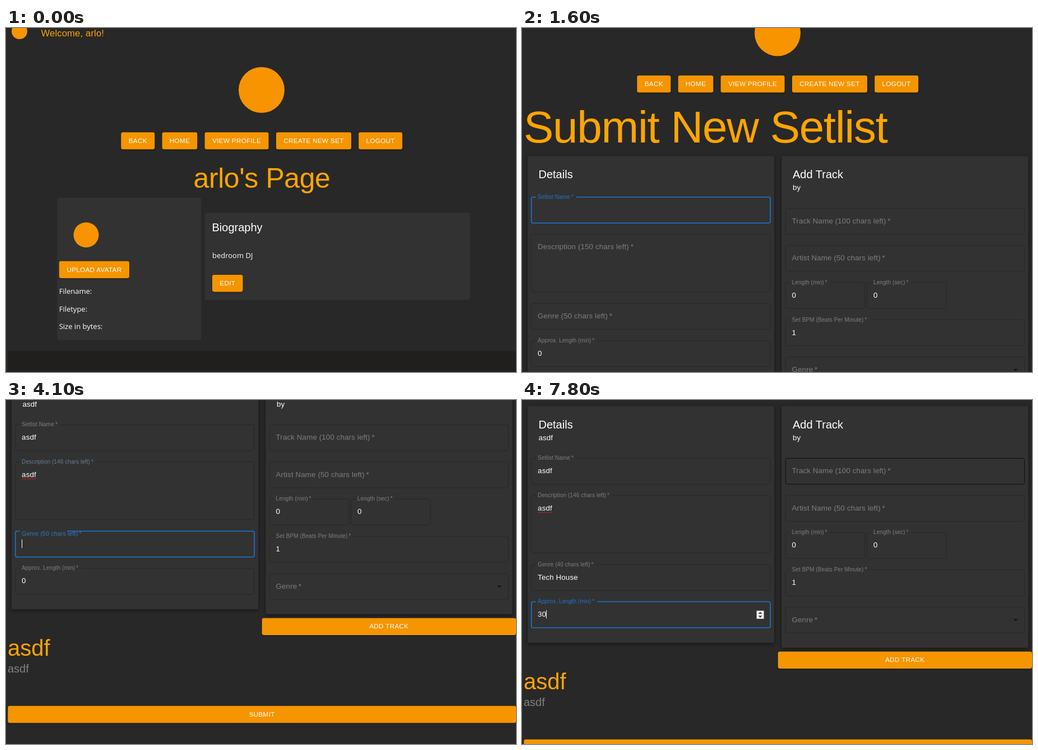
An HTML page for the animation above (8000 ms loop, 910 px wide and 616 px high).

```html
<!DOCTYPE html>
<html lang="en">
<head>
<meta charset="utf-8">
<title>Setlist form</title>
<style>
  html, body { margin: 0; width: 100%; height: 100%; overflow: hidden; background: #282828; }
  svg { display: block; width: 910px; height: 616px; font-family: 'Liberation Sans', Arial, sans-serif; }
  .card { fill: #323232; filter: drop-shadow(0 2px 3px rgba(0, 0, 0, .45)); }
  .flat { fill: #323232; }
  .btn { filter: drop-shadow(0 1px 1.5px rgba(0, 0, 0, .4)); }
  .body { font-family: 'Open Sans', 'Noto Sans', sans-serif; }
</style>
</head>
<body>
<svg id="stage" viewBox="0 0 910 616" xmlns="http://www.w3.org/2000/svg"></svg>
<script>
const stage = document.getElementById('stage');
const pen = document.createElement('canvas').getContext('2d');

const LOOP = 8000, STEP = 100;
const ORANGE = '#ffa500', BUTTON = [245, 149, 0], BUTTON_HOVER = [199, 120, 0];
const GREY = [126, 126, 126], BLUE = [25, 118, 210];
const USER = 'arlo';
const PAGE_SWITCH = 900;
const INPUT = 13.33, INPUT_GAP = 0.125;

const clamp = v => Math.min(1, Math.max(0, v));
const smooth = v => v * v * (3 - 2 * v);
const easeOut = v => 1 - (1 - clamp(v)) ** 3;
const mix = (a, b, k) => `rgb(${a.map((v, i) => Math.round(v + (b[i] - v) * k))})`;
const between = (t, from, to) => t >= from && t < to;

// time, scroll offset, easing toward this key
const SCROLL = [
  [0, 0], [1300, 0], [1400, 9.5], [1800, 194, smooth], [3300, 194], [3400, 267.5],
  [3700, 380.2, easeOut], [7300, 380.2], [7800, 320.2, smooth], [LOOP, 320.2]
];

function scrollAt(t) {
  const i = SCROLL.findIndex(key => key[0] > t);
  const [t0, a] = SCROLL[i - 1], [t1, b, ease = v => v] = SCROLL[i];
  return a + (b - a) * ease((t - t0) / (t1 - t0));
}

function typed(t, text, steps) {
  const done = steps.filter(([at]) => t >= at);
  return done.length ? text.slice(0, done[done.length - 1][1]) : '';
}

function measure(text, size, gap) {
  pen.font = `${size}px 'Liberation Sans', Arial, sans-serif`;
  return pen.measureText(text).width + text.length * gap;
}

const text = (x, y, size, fill, str, gap = 0, extra = '') =>
  `<text x="${x}" y="${y}" font-size="${size}" fill="${fill}" letter-spacing="${gap}" ${extra}>${str}</text>`;

const rect = (x, y, w, h, attrs) =>
  `<rect x="${x}" y="${y}" width="${w}" height="${h}" ${attrs}/>`;

const card = (x, y, w, h, cls = 'card') => rect(x, y, w, h, `rx="3.3" class="${cls}"`);

const dot = (x, y, r) => `<circle cx="${x}" cy="${y}" r="${r}" fill="#f79400"/>`;

const button = (x, y, w, label, hover = 0) =>
  rect(x, y, w, 30.4, `rx="3.3" class="btn" fill="${mix(BUTTON, BUTTON_HOVER, hover)}"`) +
  text(x + w / 2, y + 19, 11.67, '#fff', label, 0.333, 'text-anchor="middle"');

function squiggle(x, y, w) {
  let d = `M${x} ${y}`;
  for (let i = 2; i <= w; i += 2) d += `L${x + i} ${y + (i % 4 ? 1.5 : 0)}`;
  return `<path d="${d}" fill="none" stroke="#d8201c" stroke-width="1"/>`;
}

// Outlined input whose label shrinks into a notch in the top border.
function field(t, x, y, w, label, value, opt = {}) {
  const { h = 46.5, on = Infinity, off = Infinity, hover, caret, selected, spinner, misspelt } = opt;
  const r = 3.3, name = label + '\u2009*';
  const focused = between(t, on, off);
  const shrink = value ? 1 : easeOut((t - on) / 200);
  const tint = easeOut((t - on) / 200) - easeOut((t - off) / 200);
  const notch = x + 8 + shrink * (measure(name, 10, 0.094) + 8);
  const stroke = focused ? mix(BLUE, BLUE, 0) : hover ? '#0d0d0d' : '#272727';
  const right = x + w, bottom = y + h, tx = x + 11.3, base = y + 27;
  const valueEnd = tx + measure(value, INPUT, INPUT_GAP);

  let out = `<path d="M${notch} ${y}H${right - r}a${r} ${r} 0 0 1 ${r} ${r}V${bottom - r}` +
    `a${r} ${r} 0 0 1 ${-r} ${r}H${x + r}a${r} ${r} 0 0 1 ${-r} ${-r}V${y + r}` +
    `a${r} ${r} 0 0 1 ${r} ${-r}H${x + 8}" fill="none" stroke="${stroke}" stroke-width="${focused ? 1.6 : 1}"/>`;
  out += text(tx, base - shrink * 24, INPUT * (1 - shrink / 4), mix(GREY, BLUE, tint), name,
    INPUT_GAP * (1 - shrink / 4));
  if (selected) out += rect(tx, base - 12, valueEnd - tx, 15, 'fill="#2f7fd6"');
  out += text(tx, base, INPUT, '#fff', value, INPUT_GAP);
  if (misspelt) out += squiggle(tx, base + 2.5, 26);
  if (caret) out += rect(Math.round(valueEnd), base - 12, 1, 15, 'fill="#fff"');
  if (spinner) {
    const sx = right - 24.5, sy = y + 16;
    out += rect(sx, sy, 13, 14.5, 'fill="#efefef"') +
      `<path d="M${sx + 3} ${sy + 5.6}h7l-3.5 -3.6zM${sx + 3} ${sy + 9}h7l-3.5 3.6z" fill="#404040"/>`;
  }
  return out;
}

function header(t) {
  const viewHover = between(t, 400, 500) ? 0.5 : 0;
  const createHover = t < PAGE_SWITCH
    ? easeOut((t - 420) / 250)
    : 1 - easeOut((t - PAGE_SWITCH) / 250);
  return dot(24, 6, 14) + dot(456, 111, 41) +
    text(62.5, 15, 16.67, ORANGE, `Welcome, ${USER}!`, 0.125) +
    button(205.3, 186.8, 60, 'BACK') +
    button(278.6, 186.8, 62.7, 'HOME') +
    button(354.6, 186.8, 114, 'VIEW PROFILE', viewHover) +
    button(482, 186.8, 134, 'CREATE NEW SET', createHover) +
    button(629.2, 186.8, 78, 'LOGOUT');
}

function profilePage() {
  const body = (x, y, str) => text(x, y, 13, '#fff', str, 0, 'class="body"');
  return text(456.5, 285.5, 50, ORANGE, `${USER}'s Page`, -0.42, 'text-anchor="middle"') +
    card(91.3, 304, 256.7, 255, 'flat') + card(355, 331, 473, 155.5, 'flat') +
    dot(143, 370.5, 22.5) +
    button(94.8, 417.5, 125.2, 'UPLOAD AVATAR') +
    body(94.7, 476, 'Filename:') + body(94.7, 507.5, 'Filetype:') + body(94.7, 539, 'Size in bytes:') +
    text(367.5, 364, 20, '#fff', 'Biography') +
    body(368, 412, 'bedroom DJ') +
    button(368, 442, 54.6, 'EDIT') +
    rect(3, 578.5, 907, 40, 'rx="3.3" fill="#201f1d"');
}

function setlistPage(t) {
  const name = typed(t, 'asdf', [[2400, 2], [2500, 4]]);
  const about = typed(t, 'asdf', [[2900, 1], [3000, 3], [3100, 4]]);
  const genre = typed(t, 'Tech House',
    [[4600, 1], [4700, 2], [4800, 3], [4900, 5], [5000, 6], [5200, 7], [5300, 9], [5400, 10]]);
  const minutes = t < 6800 ? '0' : typed(t, '30', [[6800, 1], [6900, 2]]);
  const push = name ? 20 : 0;
  const L = 16.8, R = 470.3, W = 426.3;
  const left = (label, y, value, opt) => field(t, L, y + push, W, label, value, opt);
  const right = (label, y, value = '', x = R, w = W, opt) => field(t, x, y, w, label, value, opt);

  return text(3, 306.8, 80, ORANGE, 'Submit New Setlist', -1.25) +
    card(10, 331, 440, 404 + push) +
    text(29.5, 371, 20, '#fff', 'Details') +
    text(29.5, 392, INPUT, '#fff', name, INPUT_GAP) +
    left('Setlist Name', 404.5, name,
      { on: 980, off: 2780, hover: between(t, 3400, 3600), caret: between(t, 2400, 2800) }) +
    left(`Description (${150 - about.length} chars left)`, 471, about, {
      h: 103.5, on: 2780, off: 4020, hover: between(t, 2000, 2300),
      caret: between(t, 2800, 4020), misspelt: t >= 4020
    }) +
    left(`Genre (${50 - genre.length} chars left)`, 595, genre,
      { on: 4020, off: 5680, hover: between(t, 5680, 7400), caret: between(t, 4020, 5680) }) +
    left('Approx. Length (min)', 661.5, minutes,
      { on: 5680, caret: t >= 6800, selected: between(t, 5680, 6800), spinner: t >= 5680 }) +

    card(463.3, 331, 440, 433) +
    text(483, 371, 20, '#fff', 'Add Track') +
    text(483, 392, INPUT, '#fff', 'by', INPUT_GAP) +
    right('Track Name (100 chars left)', 424.5, '', R, W, { hover: t >= 7700 }) +
    right('Artist Name (50 chars left)', 491) +
    right('Length (min)', 557.5, '0', R, 141.5) +
    right('Length (sec)', 557.5, '0', 615.7, 141.5) +
    right('Set BPM (Beats Per Minute)', 624.3, '1') +
    right('Genre', 691) +
    '<path d="M876.3 712.2h8.4l-4.2 4.2z" fill="#161616"/>' +
    button(456.7, 770.7, 453.3, 'ADD TRACK') +

    text(3, 838, 40, ORANGE, name) +
    text(3, 868, 20, '#808080', about) +
    button(3.3, 928, 906.7, 'SUBMIT');
}

function render(t) {
  const page = t < PAGE_SWITCH ? profilePage() : setlistPage(t);
  stage.innerHTML = rect(0, 0, 910, 616, 'fill="#282828"') +
    `<g transform="translate(0 ${-scrollAt(t)})">${header(t)}${page}</g>`;
}

const start = performance.now();
let shown = -1;
function tick() {
  const t = Math.floor(((performance.now() - start) % LOOP) / STEP) * STEP;
  if (t !== shown) render(shown = t);
  requestAnimationFrame(tick);
}
tick();
</script>
</body>
</html>
```
